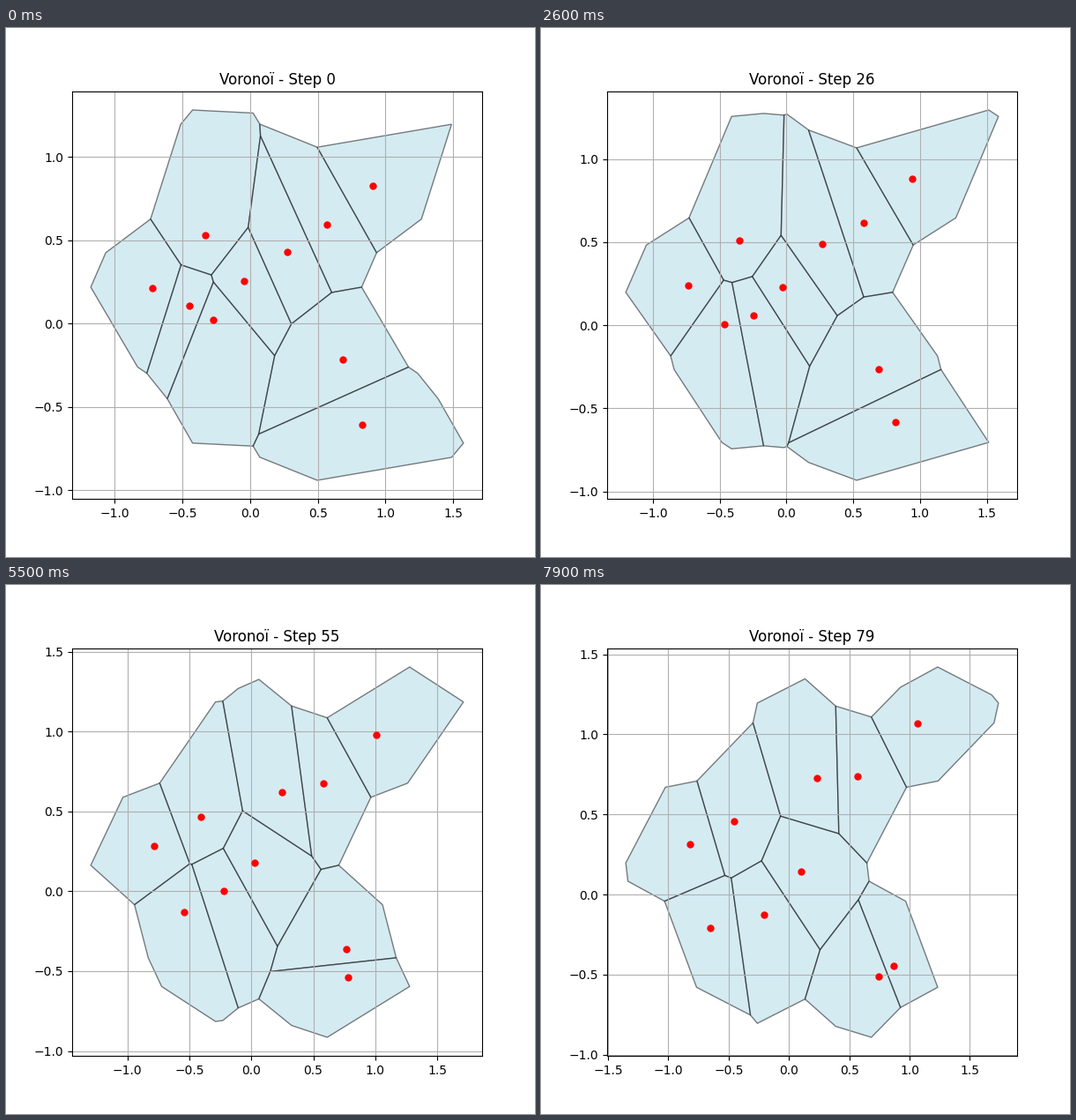
Animation, 600 px wide and 600 px high, one loop 8 s. Source, as a matplotlib script:

```python
import numpy as np
import matplotlib.pyplot as plt
from matplotlib.animation import FuncAnimation

FRAMES, INTERVAL = 80, 100
PERIOD = 2.0  # the plane is a torus, repeating every 2 units

# Each seed glides through four key positions, written as x + iy
KEY_STEPS = np.array([0, 17, 37, 79])
PATHS = np.array([
    [-.333+.532j, -.338+.526j, -.372+.482j, -.454+.458j],
    [-.720+.215j, -.724+.229j, -.753+.260j, -.819+.315j],
    [-.447+.109j, -.456+.055j, -.480-.059j, -.651-.208j],
    [-.272+.024j, -.253+.048j, -.236+.061j, -.205-.125j],
    [-.044+.257j, -.037+.245j, -.018+.207j, .102+.144j],
    [.274+.432j, .271+.456j, .260+.538j, .234+.728j],
    [.567+.596j, .572+.605j, .580+.634j, .571+.739j],
    [.905+.830j, .919+.853j, .968+.918j, 1.068+1.069j],
    [.684-.215j, .684-.236j, .708-.301j, .869-.445j],
    [.827-.608j, .821-.597j, .805-.563j, .744-.510j],
])
SLOPES = np.gradient(PATHS, KEY_STEPS, axis=1)

SHIFTS = PERIOD * np.array([(i, j) for i in (-1, 0, 1) for j in (-1, 0, 1)])


def seeds_at(step):
    """Smooth (cubic Hermite) position of every seed."""
    k = min(np.searchsorted(KEY_STEPS, step, side="right"), 3) - 1
    h = KEY_STEPS[k + 1] - KEY_STEPS[k]
    u = (step - KEY_STEPS[k]) / h
    ease = u * u * (3 - 2 * u)
    z = (PATHS[:, k] * (1 - ease) + PATHS[:, k + 1] * ease
         + u * (1 - u) * h * ((1 - u) * SLOPES[:, k] - u * SLOPES[:, k + 1]))
    return np.column_stack([z.real, z.imag])


def clip(poly, normal):
    """Keep the part of poly nearer to the origin than to normal."""
    side = poly @ normal - normal @ normal / 2
    out = []
    for i in range(len(poly)):
        j = (i + 1) % len(poly)
        if side[i] <= 0:
            out.append(poly[i])
        if (side[i] <= 0) != (side[j] <= 0):
            t = side[i] / (side[i] - side[j])
            out.append(poly[i] + t * (poly[j] - poly[i]))
    return np.array(out)


def cell(seeds, i):
    """Voronoi cell of seed i on the torus, unrolled around that seed."""
    offsets = (seeds - seeds[i] + PERIOD / 2) % PERIOD - PERIOD / 2
    images = (offsets[:, None] + SHIFTS).reshape(-1, 2)
    dist = np.hypot(*images.T)
    poly = np.array([(-2, -2), (2, -2), (2, 2), (-2, 2)], float)
    for k in np.argsort(dist)[1:]:
        if dist[k] > 2 * np.hypot(*poly.T).max():
            break
        poly = clip(poly, images[k])
    return poly + seeds[i]


fig, ax = plt.subplots(figsize=(6, 6), dpi=100)


def draw(step):
    ax.clear()
    seeds = seeds_at(step)
    for i in range(len(seeds)):
        ax.fill(*cell(seeds, i).T, facecolor="lightblue",
                edgecolor="black", alpha=0.5)
    ax.plot(*seeds.T, "ro", markersize=5)
    ax.set_title(f"Voronoï - Step {step}")
    ax.grid(True)


anim = FuncAnimation(fig, draw, frames=FRAMES, interval=INTERVAL,
                     init_func=lambda: None, repeat=True, repeat_delay=0)
plt.show()
```
